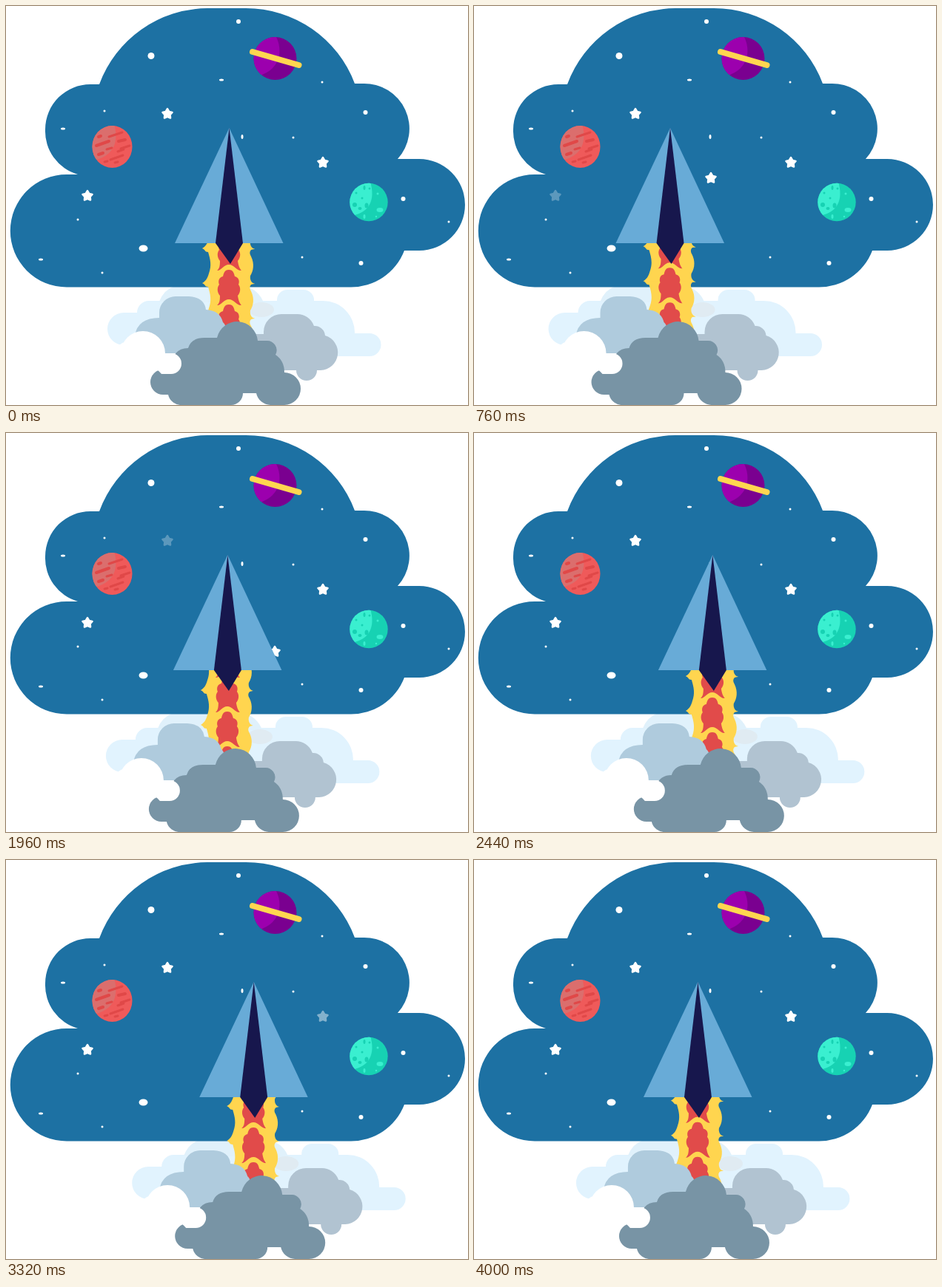
An HTML page for the animation above (4.04 s loop, 624 px wide and 540 px high).

```html
<!DOCTYPE html>
<html lang="en">
<head>
<meta charset="utf-8">
<title>Rocket launch</title>
<style>
  html, body { margin: 0; width: 100%; height: 100%; overflow: hidden; background: #fff; }
  svg { display: block; width: 624px; height: 540px; }
</style>
</head>
<body>
<svg viewBox="0 0 624 540">
  <defs>
    <clipPath id="nozzle"><path d="M220 321H380V442H220Z"/></clipPath>
    <clipPath id="purple"><circle cx="363.5" cy="71" r="29"/></clipPath>
    <clipPath id="red"><ellipse cx="143.5" cy="190.5" rx="27" ry="28.5"/></clipPath>
    <clipPath id="green"><circle cx="490" cy="265.5" r="25.7"/></clipPath>
    <g id="tongue">
      <path fill="#ffd54f" d="M265-1C270 1 268 4 273 4C276 14 278 22 274 33C272 40 269 44 265 46L280 49H322L336 47C332 46 329 42 330 36C334 30 336 20 331 10C327 4 331-1 336 0L322-1H280Z"/>
    </g>
    <path id="core" fill="#e14b4a" d="M301 28C307 28 308 33 309 37C314 38 316 43 314 48C318 53 316 60 313 63C314 70 316 74 318 76C312 77 308 68 301 68C294 68 290 77 285 76C288 74 289 70 289 63C286 60 284 53 288 48C286 43 288 38 293 37C294 33 295 28 301 28Z"/>
    <path id="star" fill="#fff" stroke="#fff" stroke-width="2.6" stroke-linejoin="round"/>
  </defs>

  <!-- pale smoke behind the sky -->
  <g class="ship">
    <path fill="#e1f3fe" d="M159 415H177A16 16 0 0 1 193 399H366V398A14 14 0 0 1 380 384H402A14 14 0 0 1 416 399H428A43 43 0 0 1 471 443H491A15.500 15.500 0 0 1 491 474H300V459H159A22 22 0 0 1 159 415Z"/>
    <path fill="#e0f1fb" d="M207 400Q213 384 228 379H322Q342 384 348 402Z"/>
    <ellipse cx="345" cy="411" rx="17" ry="10" fill="#e0ebf2"/>
  </g>

  <path fill="#1d71a3" d="M126 106A157 157 0 0 1 272 3H324A157 157 0 0 1 471 105H482A61 61 0 0 1 529 207H558A62 62 0 0 1 558 331H538A77 77 0 0 1 465 380.500H82A76 76 0 0 1 82 228H97A61 61 0 0 1 53 167A61 61 0 0 1 114 106Z"/>

  <g clip-path="url(#purple)">
    <path fill="#7a0090" d="M330 40H400V102H330Z"/>
    <path fill="#9c00ae" d="M330 40H364C374 58 372 84 343 94H330Z"/>
  </g>
  <path d="M333 62L395.500 80" stroke="#ffd650" stroke-width="8" stroke-linecap="round"/>

  <g clip-path="url(#red)">
    <path fill="#ef5a5a" d="M115 160H172V220H115Z"/>
    <path fill="#db6e6d" d="M115 160H146C152 180 148 201 122 208H115Z"/>
    <g stroke="#e04848" stroke-width="4" stroke-linecap="round">
      <path d="M122 189L139 183M125 177L128 176M152 183L161 181M125 201L131 199"/>
      <path stroke-width="3" d="M139 177L157 171M136 194L143 192M141 208L158 202M155 193L167 189M147 212L151 211M133 211L137 210M151 197L159 194"/>
    </g>
  </g>

  <g clip-path="url(#green)">
    <path fill="#17d2b3" d="M463 238H517V292H463Z"/>
    <path fill="#3aefd0" d="M463 238H492C498 258 494 277 471 283H463Z"/>
    <g fill="#17d2b3">
      <ellipse cx="471" cy="269" rx="3" ry="3"/><ellipse cx="478" cy="274" rx="2.500" ry="2"/>
      <ellipse cx="487" cy="270" rx="2.500" ry="3.500"/><ellipse cx="484" cy="246" rx="1.500" ry="3"/>
      <circle cx="473" cy="253" r="1.500"/><circle cx="481" cy="260" r="1.500"/><circle cx="491" cy="247" r="1.500"/>
    </g>
    <g fill="#3aefd0">
      <ellipse cx="505" cy="276" rx="4.500" ry="3"/><ellipse cx="484" cy="285" rx="1.500" ry="3"/>
      <circle cx="502" cy="254" r="1.500"/><circle cx="500" cy="285" r="1.200"/>
    </g>
  </g>

  <g id="dots" fill="#fff"></g>
  <g id="stars"></g>

  <g class="ship">
    <g clip-path="url(#nozzle)"><g id="flame"></g></g>
    <path fill="#afcbdd" d="M174 446Q178 422 207 422V415A22 22 0 0 1 229 393H247Q268 394 270 411Q289 412 293 428Q298 432 298 442V470H174Z"/>
    <path fill="#b1c3d1" d="M333 444H348V441A24 24 0 0 1 372 417H392A24 24 0 0 1 416 433A14 14 0 0 1 431 446A24 24 0 0 1 425 493H420A14 14 0 0 1 392 493H340Z"/>
    <path fill="#7894a5" d="M212 492H222Q224 463 246 463Q250 449 268 449H285A28 29 0 0 1 340 453H351A13 13 0 0 1 364 472Q376 480 376 496A22 22 0 0 1 376 540H358A20 20 0 0 1 338 524H320A16 16 0 0 1 304 540H238A18 18 0 0 1 219 526H212A17 17 0 0 1 212 492Z"/>
    <path fill="#fff" d="M155 470A30 30 0 0 1 215 470H223A14 14 0 0 1 223 498H210Q205 492 200 490H155Z"/>
    <circle cx="161" cy="464" r="9" fill="#fff"/>
    <path fill="#68abd7" d="M301.500 165L374.500 321H228Z"/>
    <path fill="#17174d" d="M301.500 165L320 321L303 349L283 321Z"/>
  </g>
</svg>
<script>
const LOOP = 4040, STEP = 40, PITCH = 47;
const $ = id => document.getElementById(id);

const dots = [
  [314, 21, 3], [196, 67.5, 4.5], [291, 100, 3, 1.5], [427, 103, 1.5], [133, 142, 1.5],
  [77, 166, 3, 1.5], [485.5, 144, 3], [319, 177, 1.5, 3], [388, 178, 1.5], [536.5, 261, 3],
  [598, 292, 1.5], [97, 289, 1.5], [185.5, 328, 6, 4.5], [47, 343, 3, 1.5], [130, 361, 1.5],
  [400, 340, 1.5], [479.5, 348, 3]
];
$('dots').innerHTML = dots.map(([x, y, rx, ry = rx]) =>
  `<ellipse cx="${x}" cy="${y}" rx="${rx}" ry="${ry}"/>`).join('');

const points = Array.from({ length: 10 }, (_, i) => {
  const r = i % 2 ? 3.8 : 6.8, a = i * Math.PI / 5;
  return `${(r * Math.sin(a)).toFixed(2)} ${(-r * Math.cos(a)).toFixed(2)}`;
});
$('star').setAttribute('d', `M${points.join('L')}Z`);

// x, y, middle of the twinkle, half its length, opacity outside and in the middle
const stars = [
  [110, 257, 780, 420, 1, .28], [218, 146, 1960, 420, 1, .28], [428, 212, 3060, 420, 1, .28],
  [320, 233, 1060, 600, 0, 1], [253, 178, 1360, 420, 0, 1], [363, 296, 1960, 420, 0, 1]
];
$('stars').innerHTML = stars.map(([x, y]) =>
  `<use href="#star" transform="translate(${x} ${y})"/>`).join('');
const starNodes = [...$('stars').children];

const column = id => [-2, -1, 0, 1, 2].map(k =>
  `<use href="#${id}" y="${k * PITCH}"/>`).join('');
$('flame').innerHTML = column('tongue') + column('core');

const ships = document.querySelectorAll('.ship');
const sway = [[0, 0], [1000, -48], [3008, 48], [4020, 0], [LOOP, 0]];

function swayAt(t) {
  const i = sway.findIndex(([end]) => t < end);
  const [t0, x0] = sway[i - 1], [t1, x1] = sway[i];
  return x0 + (x1 - x0) * (t - t0) / (t1 - t0);
}

function draw(now) {
  const t = Math.floor(now % LOOP / STEP) * STEP;
  const x = swayAt(t);
  ships.forEach(s => s.setAttribute('transform', `translate(${x} 0)`));
  const fall = t / LOOP * 5 * PITCH % PITCH;
  $('flame').setAttribute('transform', `translate(0 ${329 + fall})`);
  stars.forEach(([, , mid, half, rest, peak], i) => {
    const k = Math.min(1, Math.max(0, 1 - Math.abs(t - mid) / half) * 2);
    starNodes[i].setAttribute('opacity', rest + (peak - rest) * k);
  });
}

const start = performance.now();
function tick() {
  draw(performance.now() - start);
  requestAnimationFrame(tick);
}
tick();
</script>
</body>
</html>
```
